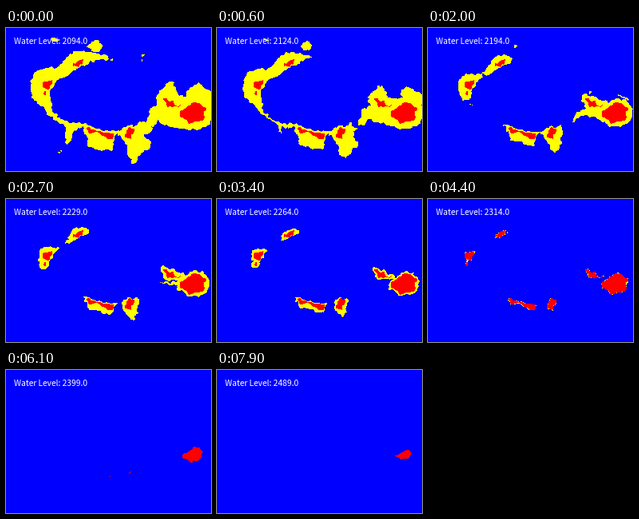
A matplotlib script for the animation above (8000 ms loop, 257x179 px).

```python
import numpy as np
import matplotlib.pyplot as plt
from matplotlib.animation import FuncAnimation

W, H, DPI = 257, 179, 64
FRAMES, STEP_MS = 80, 100
START, RISE, PEAK = 2094, 5, 2320   # first level, rise per step, red threshold
WALL = 90                           # steepness of cliffs, per pixel
SEA, SHORE, HILL = (0, 0, 255), (255, 255, 0), (255, 0, 0)

plt.rcParams["text.hinting"] = "force_autohint"


def wobble(rng, x, y, waves=14):
    """Smooth random displacement that roughens coastlines."""
    total = np.zeros_like(x)
    for _ in range(waves):
        turn, phase = rng.uniform(0, 2 * np.pi, 2)
        freq = 2 * np.pi / rng.uniform(4, 18)
        total += np.sin(freq * (x * np.cos(turn) + y * np.sin(turn)) + phase)
    return 0.3 * total


rng = np.random.default_rng(7)
gx, gy = np.meshgrid(np.arange(W, dtype=float), np.arange(H, dtype=float))
X, Y = gx + wobble(rng, gx, gy), gy + wobble(rng, gx, gy)
height = np.full((H, W), -1e4)


def project(ax, ay, bx, by):
    """Position along a segment (0 to 1) and distance from it."""
    dx, dy = bx - ax, by - ay
    t = ((X - ax) * dx + (Y - ay) * dy) / max(dx * dx + dy * dy, 1e-9)
    t = np.clip(t, 0, 1)
    return t, np.hypot(X - ax - t * dx, Y - ay - t * dy)


def ridge(*nodes):
    """Raise a crest through (x, y, summit, radius at the first level)."""
    global height
    for (ax, ay, ah, ar), (bx, by, bh, br) in zip(nodes, nodes[1:] or nodes):
        t, d = project(ax, ay, bx, by)
        top, reach = ah + t * (bh - ah), ar + t * (br - ar)
        height = np.maximum(height, top - (top - START) * d / reach)


def basin(*pts):
    """Flood a polygon and cut cliffs around it."""
    global height
    near, inside = np.full((H, W), 1e9), np.zeros((H, W), bool)
    for (ax, ay), (bx, by) in zip(pts, pts[1:] + pts[:1]):
        near = np.minimum(near, project(ax, ay, bx, by)[1])
        if ay != by:
            cross = ax + (Y - ay) * (bx - ax) / (by - ay)
            inside ^= ((ay > Y) != (by > Y)) & (X < cross)
    height = np.minimum(height, START + WALL * np.where(inside, -near, near))


# Western crescent
ridge((126, 36, 2115, 3), (115, 35, 2135, 4), (104, 37, 2220, 7),
      (96, 41, 2350, 13), (91, 43.5, 2401, 15), (84, 46.5, 2325, 14),
      (78, 53, 2260, 13), (68, 57, 2200, 11), (57, 67, 2325, 15),
      (52, 71, 2401, 22), (50, 77, 2315, 16), (47, 81, 2340, 15),
      (49, 89, 2185, 10), (53, 96, 2198, 7), (57, 104, 2150, 7),
      (64, 111, 2130, 5), (70, 115.5, 2130, 4), (80, 120, 2150, 6))
# Southern islands
ridge((77, 144, 2100, 2), (80, 121, 2150, 6), (92, 122, 2126, 5),
      (100, 124, 2215, 7), (106, 127, 2400, 21), (113, 129.5, 2330, 20),
      (121, 132, 2340, 21), (129, 133, 2402, 20))
ridge((158, 125, 2400, 14), (154, 131, 2405, 18), (155, 138, 2335, 20),
      (159, 150, 2245, 13), (160, 165, 2110, 4))
ridge((160, 126, 2200, 12), (177, 126, 2115, 6))
ridge((158, 140, 2300, 18), (176, 147, 2125, 6))
# Eastern island
ridge((223, 107.5, 2489, 13), (232, 107, 2590, 20), (238, 105, 2590, 22))
ridge((197, 88, 2355, 9), (204, 94, 2404, 14), (211, 96, 2335, 12),
      (219, 97, 2325, 12))
ridge((176, 121, 2110, 3), (182, 117, 2215, 6), (188, 106, 2225, 9),
      (202, 105, 2240, 16), (216, 105, 2250, 22))
ridge((206, 70, 2125, 4), (204, 80, 2210, 12))
ridge((242, 73, 2130, 4), (238, 83, 2200, 12), (251, 90, 2205, 12))

# Crater lake, then two bays on the south coast
basin((126, 39), (104, 42.5), (92, 49), (80, 57), (64, 64), (58, 71),
      (54.5, 82), (55, 93), (58, 103), (68, 113), (82, 117.5), (100, 120.5),
      (112, 125), (130, 129), (143, 127), (152, 121.5), (165, 121),
      (178, 100), (170, 50), (135, 46))
basin((139, 131), (134, 140), (134, 170), (154, 170), (152, 148))
basin((84, 130), (90, 124), (96, 123), (101, 138), (104, 150), (104, 170),
      (80, 170))

# Islets
ridge((109, 22.5, 2230, 7), (113, 22.5, 2190, 7))
ridge((57, 14, 2150, 2), (62, 15, 2150, 3))
for x, y in (131, 40), (172, 34), (171, 39), (70, 152), (67, 155):
    ridge((x, y, 2110, 1.4))


def paint(level):
    img = np.empty((H, W, 3), np.uint8)
    img[:] = SEA
    img[height >= level] = SHORE
    img[height >= max(level, PEAK)] = HILL
    return img


fig = plt.figure(figsize=(W / DPI, H / DPI), dpi=DPI)
ax = fig.add_axes([0, 0, 1, 1])
ax.axis("off")
view = ax.imshow(paint(START), interpolation="nearest", aspect="auto",
                 extent=(0, W, H, 0))
label = ax.text(10, 20, "", color="white", family="Noto Sans CJK JP",
                size=10.2 * 72 / DPI, va="baseline")


def update(i):
    level = START + RISE * i
    view.set_data(paint(level))
    label.set_text(f"Water Level: {level:.1f}")
    return view, label


anim = FuncAnimation(fig, update, frames=FRAMES, interval=STEP_MS,
                     repeat=True, repeat_delay=0)
plt.show()
```
